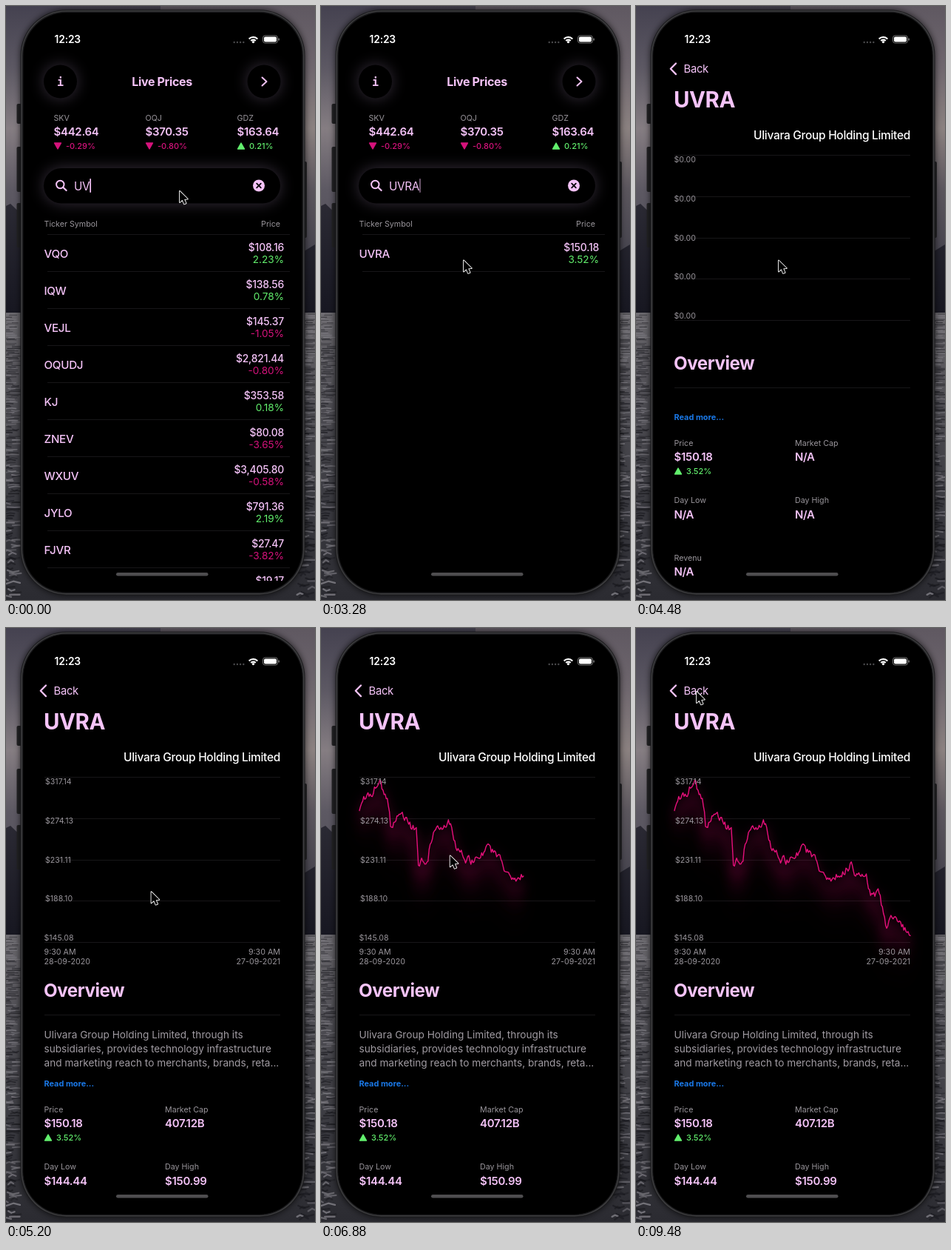
An HTML page with a canvas for the animation above (9520 ms loop, 418 px wide and 802 px high).

```html
<!DOCTYPE html>
<html lang="en">
<head>
<meta charset="utf-8">
<title>Live Prices</title>
<style>
  html, body { margin: 0; width: 100%; height: 100%; overflow: hidden; background: #000; }
  canvas { display: block; width: 418px; height: 802px; }
</style>
</head>
<body>
<canvas id="stage"></canvas>
<script>
const W = 418, H = 802, LOOP = 9520;
const PINK = '#f5c3f8', GREY = '#99959b', RED = '#d6127c', GREEN = '#62ef6d', LINE = '#e6107b';
const TICKER = 'UVRA', COMPANY = 'Ulivara Group Holding Limited';

const dpr = window.devicePixelRatio || 1;
const stage = document.getElementById('stage');
let ctx = prepare(stage);

function prepare(canvas) {
  canvas.width = W * dpr;
  canvas.height = H * dpr;
  const c = canvas.getContext('2d');
  c.scale(dpr, dpr);
  return c;
}

const clamp = v => Math.min(1, Math.max(0, v));
const ramp = (t, from, to) => clamp((t - from) / (to - from));
const mix = (a, b, p) => a + (b - a) * p;

function seeded(seed) {
  return () => {
    seed = (seed * 16807) % 2147483647;
    return seed / 2147483647;
  };
}

// Text is placed by the middle of its capitals.
function text(str, x, mid, size, { weight = 400, color = PINK, align = 'left', track = 0, family = 'Inter, sans-serif' } = {}) {
  ctx.font = `${weight} ${size}px ${family}`;
  ctx.letterSpacing = `${track * size}px`;
  ctx.textAlign = align;
  ctx.fillStyle = color;
  ctx.fillText(str, x, mid + size * 0.364);
  return ctx.measureText(str).width;
}

const label = (str, x, y, align) => text(str, x, y, 10.7, { color: GREY, align });
const value = (str, x, y) => text(str, x, y, 15, { weight: 600, track: -0.02 });

function polyline(points, color, width, closed) {
  ctx.beginPath();
  points.forEach(([x, y]) => ctx.lineTo(x, y));
  if (closed) ctx.closePath();
  ctx.strokeStyle = color;
  ctx.lineWidth = width;
  ctx.lineCap = ctx.lineJoin = 'round';
  ctx.stroke();
}

function chevron(x, y, dx, dy, width) {
  polyline([[x - dx, y - dy], [x, y], [x - dx, y + dy]], PINK, width);
}

function box(x, y, w, h, r, color) {
  ctx.beginPath();
  ctx.roundRect(x, y, w, h, r);
  ctx.fillStyle = color;
  ctx.fill();
}

function disc(x, y, r, color) {
  ctx.beginPath();
  ctx.arc(x, y, r, 0, 7);
  ctx.fillStyle = color;
  ctx.fill();
}

function rule(x1, x2, y) {
  ctx.fillStyle = '#171618';
  ctx.fillRect(x1, y, x2 - x1, 1);
}

function shaded(color, blur, draw) {
  ctx.save();
  ctx.shadowColor = color;
  ctx.shadowBlur = blur * dpr;
  draw();
  ctx.restore();
}

const glowing = draw => shaded('rgba(205,175,220,.27)', 20, draw);

function change(pct, x, y) {
  const up = pct[0] !== '-', s = up ? -1 : 1, color = up ? GREEN : RED;
  ctx.fillStyle = color;
  polyline([[x + 1, y - 4 * s], [x + 10, y - 4 * s], [x + 5.5, y + 4 * s]], color, 1.4, true);
  ctx.fill();
  text(pct, x + 16.5, y, 11, { weight: 500, color });
}

// Scenery and phone body

function vertical(y1, y2, ...colors) {
  const g = ctx.createLinearGradient(0, y1, 0, y2);
  colors.forEach((c, i) => g.addColorStop(i / (colors.length - 1), c));
  return g;
}

function fillArea(points, fill) {
  ctx.beginPath();
  points.forEach(([x, y]) => ctx.lineTo(x, y));
  ctx.fillStyle = fill;
  ctx.fill();
}

function paintBackdrop() {
  const horizon = 414, mountain = vertical(270, horizon, '#2a2933', '#171721');
  ctx.fillStyle = vertical(0, 330, '#454250', '#5c5863', '#857d82', '#5d5963', '#504e58');
  ctx.fillRect(0, 0, W / 2, horizon);
  ctx.fillStyle = vertical(0, 330, '#5f5861', '#6f676e', '#8b8180', '#5b565d', '#47454f');
  ctx.fillRect(W / 2, 0, W / 2, horizon);
  fillArea([[0, 270], [6, 267], [30, 290], [30, horizon], [0, horizon]], mountain);
  fillArea([[395, 336], [W, 322], [W, horizon], [395, horizon]], mountain);
  ctx.fillStyle = vertical(horizon, H, '#69676c', '#4c4b51', '#3a3a40', '#2b2b31');
  ctx.fillRect(0, horizon, W, H - horizon);

  const rand = seeded(41);
  for (let y = horizon + 2; y < H; y += 1.4 + (y - horizon) / 160) {
    const depth = (y - horizon) / (H - horizon);
    for (const side of [0, 400]) {
      const x = side + rand() * 16 - 7, len = 6 + rand() * 14, dy = (rand() - 0.5) * 8 * depth;
      ctx.globalAlpha = 0.35 + rand() * 0.4;
      polyline([[x, y], [x + len / 2, y + dy], [x + len, y + dy / 3]],
        rand() < 0.6 ? '#17171c' : '#8a888f', 0.8 + depth * 1.6);
    }
  }
  ctx.globalAlpha = 1;

  for (const [y, h] of [[132, 27], [190, 61], [266, 60]]) box(14.5, y, 7, h, 2, '#222224');
  box(401, 210, 6, 103, 2, '#252527');
  shaded('rgba(0,0,0,.7)', 8, () => box(19.5, 5, 385, 790.5, 62, '#1b1b1d'));
  ['#3d3d3f', '#19191b', '#000'].forEach((color, i) => {
    const inset = 1 + i * 1.5;
    box(19.5 + inset, 5 + inset, 385 - 2 * inset, 790.5 - 2 * inset, 62 - inset, color);
  });
}

const backdrop = document.createElement('canvas');
{
  const screen = ctx;
  ctx = prepare(backdrop);
  paintBackdrop();
  ctx = screen;
}

function statusBar() {
  text('12:23', 65.5, 45, 13.8, { weight: 600, color: '#fff', track: -0.01 });
  for (let i = 0; i < 4; i++) disc(308.7 + i * 4.2, 49, 1.2, '#4a4a4c');
  ctx.lineCap = 'butt';
  ctx.strokeStyle = '#fff';
  for (const r of [4.4, 8]) {
    ctx.beginPath();
    ctx.arc(334.5, 50, r, -Math.PI * 0.76, -Math.PI * 0.24);
    ctx.lineWidth = 2.1;
    ctx.stroke();
  }
  disc(334.5, 48.6, 1.7, '#fff');
  ctx.beginPath();
  ctx.roundRect(347.5, 40, 20, 10, 3);
  ctx.strokeStyle = '#777';
  ctx.lineWidth = 1;
  ctx.stroke();
  box(349, 41.5, 17, 7, 1.8, '#fff');
  box(368.5, 43.5, 1.4, 3.2, 0.7, '#777');
}

// Price list screen

const indices = ['SKV $442.64 -0.29%', 'OQJ $370.35 -0.80%', 'GDZ $163.64 0.21%'];
const stocks = [
  'VQO $108.16 2.23%', 'IQW $138.56 0.78%', 'VEJL $145.37 -1.05%', 'OQUDJ $2,821.44 -0.80%',
  'KJ $353.58 0.18%', 'ZNEV $80.08 -3.65%', 'WXUV $3,405.80 -0.58%', 'JYLO $791.36 2.19%',
  'FJVR $27.47 -3.82%', 'HUQE $19.17 1.04%'
];

function row(quote, i) {
  const [symbol, price, pct] = quote.split(' '), y = 334 + i * 50;
  rule(56, 384, y - 26);
  text(symbol, 51.5, y, 15.2, { weight: 500, track: -0.02 });
  text(price, 376, y - 8, 13.9, { weight: 500, align: 'right', track: -0.015 });
  text(pct, 376, y + 8, 13.6, { color: pct[0] === '-' ? RED : GREEN, align: 'right' });
}

function caretAlpha(t) {
  if (t < 900) return 1;
  const phase = (t - 900) % 1020;
  return 1 - ramp(phase, 0, 100) + ramp(phase, 280, 400);
}

function searchField(t) {
  glowing(() => box(51, 219, 320, 47.5, 24, '#000'));
  ctx.beginPath();
  ctx.arc(73.3, 241, 5.2, 0, 7);
  ctx.strokeStyle = PINK;
  ctx.lineWidth = 2;
  ctx.stroke();
  polyline([[77.4, 245], [81.6, 249]], PINK, 2.2);

  const typed = TICKER.slice(0, t < 120 ? 2 : t < 300 ? 3 : 4);
  const width = text(typed, 92, 243, 15.3, { track: -0.02 });
  ctx.globalAlpha = caretAlpha(t);
  box(92 + width, 233, 1.7, 19, 0.8, PINK);
  ctx.globalAlpha = 1;

  disc(342, 242.5, 8, PINK);
  for (const d of [2.8, -2.8]) polyline([[342 - d, 239.7], [342 + d, 245.3]], '#000', 1.8);
}

function homeScreen(t) {
  for (const x of [73.5, 349]) glowing(() => disc(x, 102, 22.5, '#000'));
  text('i', 73.5, 102.5, 15, { weight: 700, align: 'center', family: '"DejaVu Sans Mono", monospace' });
  chevron(352.5, 102, 6, 5.5, 2);
  text('Live Prices', 211, 102, 16, { weight: 700, align: 'center', track: -0.02 });

  indices.forEach((quote, i) => {
    const [name, price, pct] = quote.split(' '), x = 64.5 + 124 * i;
    label(name, x, 151);
    value(price, x, 170);
    change(pct, x, 189);
  });
  searchField(t);
  label('Ticker Symbol', 51.5, 294);
  label('Price', 371, 294, 'right');

  const listAlpha = 1 - ramp(t, 1480, 1800);
  if (listAlpha > 0) {
    ctx.save();
    ctx.beginPath();
    ctx.rect(0, 300, W, 476);
    ctx.clip();
    ctx.globalAlpha = listAlpha;
    stocks.forEach(row);
    ctx.restore();
  }
  if (t >= 2760) {
    row(TICKER + ' $150.18 3.52%', 0);
    rule(56, 384, 358);
  }
}

// Detail screen: a few turning points, roughened by seeded noise

const turns = [
  [52, 252], [60, 230], [79, 207], [90, 236], [95, 274], [104, 252], [129, 274], [132, 321],
  [144, 312], [152, 270], [176, 264], [185, 300], [204, 317], [224, 301], [240, 306], [254, 337],
  [276, 336], [292, 316], [300, 337], [312, 339], [318, 361], [329, 355], [338, 402], [355, 390], [371, 420]
];

function buildSeries() {
  const rand = seeded(77), points = [];
  let leg = 1, drift = 0;
  for (let x = 52; x <= 371; x += 1.45) {
    while (turns[leg][0] < x) leg++;
    const [x1, y1] = turns[leg - 1], [x2, y2] = turns[leg];
    drift = drift * 0.55 + (rand() - 0.5) * 11;
    points.push([x, Math.min(424, Math.max(201, mix(y1, y2, ramp(x, x1, x2)) + drift))]);
  }
  return points;
}

const series = buildSeries();
const lengthTo = limit => series.reduce((sum, [x, y], i) =>
  i && x <= limit ? sum + Math.hypot(x - series[i - 1][0], y - series[i - 1][1]) : sum, 0);
const fullLength = lengthTo(W);
const DRAW_TIME = 2200;
const drawStart = 6040 - DRAW_TIME * lengthTo(140) / fullLength;
const lineGlow = [0.65, 0.4, 0.2, 0.1].map((alpha, i) =>
  `drop-shadow(0 ${9 * (i + 1) * dpr}px ${8.5 * dpr}px rgba(230,16,123,${alpha}))`).join(' ');

function chart(t, loaded) {
  for (let i = 0; i < 5; i++) rule(52, 371, Math.round(201 + i * 55.75));
  const drawn = ramp(t, drawStart, drawStart + DRAW_TIME);
  if (drawn > 0) {
    ctx.save();
    ctx.filter = lineGlow;
    if (drawn < 1) ctx.setLineDash([drawn * fullLength, fullLength * 2]);
    polyline(series, LINE, 1.4);
    ctx.restore();
  }
  for (let i = 0; i < 5; i++) {
    const price = loaded ? mix(317.14, 145.084, i / 4) : 0;
    text('$' + price.toFixed(2), loaded && i < 4 ? 53 : 51.5, 207.5 + i * 52.6, 10.6, { color: GREY });
  }
  if (loaded) {
    label('9:30 AM', 51.5, 437);
    label('28-09-2020', 51.5, 450);
    label('9:30 AM', 371, 437, 'right');
    label('27-09-2021', 371, 450, 'right');
  }
}

function stat(name, amount, x, y) {
  label(name, x, y);
  value(amount, x, y + 19);
}

function detailScreen(t) {
  const info = t >= 4640, prices = t >= 5020;
  chevron(46.8, 84.8, -7.2, 7.3, 2.3);
  text('Back', 64.5, 85, 14.8, { track: -0.02 });
  text(TICKER, 51, 126, 29.4, { weight: 700, track: -0.015 });
  text(COMPANY, 371, 174, 15.5, { weight: 500, color: '#fff', align: 'right', track: -0.02 });
  chart(t, prices);

  const shift = prices ? 7 : 0, lower = shift + (info ? 53 : 0);
  text('Overview', 51, 482 + shift, 24.2, { weight: 700, track: -0.02 });
  rule(52, 371, 515 + shift);
  if (info) {
    [COMPANY + ', through its',
      'subsidiaries, provides technology infrastructure',
      'and marketing reach to merchants, brands, reta...'
    ].forEach((line, i) => text(line, 51.5, 542 + shift + i * 19, 13.65, { color: '#a09ba2' }));
  }
  text('Read more...', 51.5, 555.5 + lower, 10.9, { weight: 700, color: '#1a78e6' });

  const y = 590 + lower;
  stat('Price', '$150.18', 51.5, y);
  change('3.52%', 51.5, y + 38);
  stat('Market Cap', info ? '407.12B' : 'N/A', 215, y);
  stat('Day Low', info ? '$144.44' : 'N/A', 51.5, y + 77.5);
  stat('Day High', info ? '$150.99' : 'N/A', 215, y + 77.5);
  if (!info) stat('Revenu', 'N/A', 51.5, y + 155);
}

// Pointer: each move is start, end and destination

const moves = [
  [1480, 1960, 227, 314], [1960, 2600, 193, 343.5], [4480, 5300, 197, 358],
  [6700, 7640, 81, 95], [8300, 8400, 82, 86]
];

function pointer(t) {
  let x = 235, y = 250;
  for (const [from, to, toX, toY] of moves) {
    const p = ramp(t, from, to);
    x = mix(x, toX, p);
    y = mix(y, toY, p);
  }
  ctx.save();
  ctx.translate(x, y);
  polyline([[0, 0], [0, 15], [3.6, 11.8], [6, 17.4], [8.6, 16.3], [6.2, 10.9], [10.8, 10.6]], '#fff', 1.8, true);
  ctx.fillStyle = '#000';
  ctx.fill();
  ctx.restore();
}

function view(draw, t, dx) {
  ctx.save();
  ctx.translate(dx, 0);
  draw(t);
  ctx.restore();
}

function render(t) {
  ctx.drawImage(backdrop, 0, 0, W, H);
  const push = 1 - Math.pow(1 - ramp(t, 3640, 4320), 4);

  ctx.save();
  ctx.beginPath();
  ctx.roundRect(23.5, 9, 377, 782.5, 58);
  ctx.clip();
  if (push < 1) view(homeScreen, t, -113 * push);
  if (push > 0) {
    const dx = 377 * (1 - push);
    ctx.fillStyle = '#000';
    ctx.fillRect(23 + dx, 8, 380, 785);
    view(detailScreen, t, dx);
  }
  statusBar();
  box(149, 765, 124.5, 4.6, 2.3, '#4e4d4f');
  ctx.restore();
  pointer(t);
}

const begun = performance.now();
function tick() {
  render((performance.now() - begun) % LOOP);
  requestAnimationFrame(tick);
}
tick();
</script>
</body>
</html>
```
